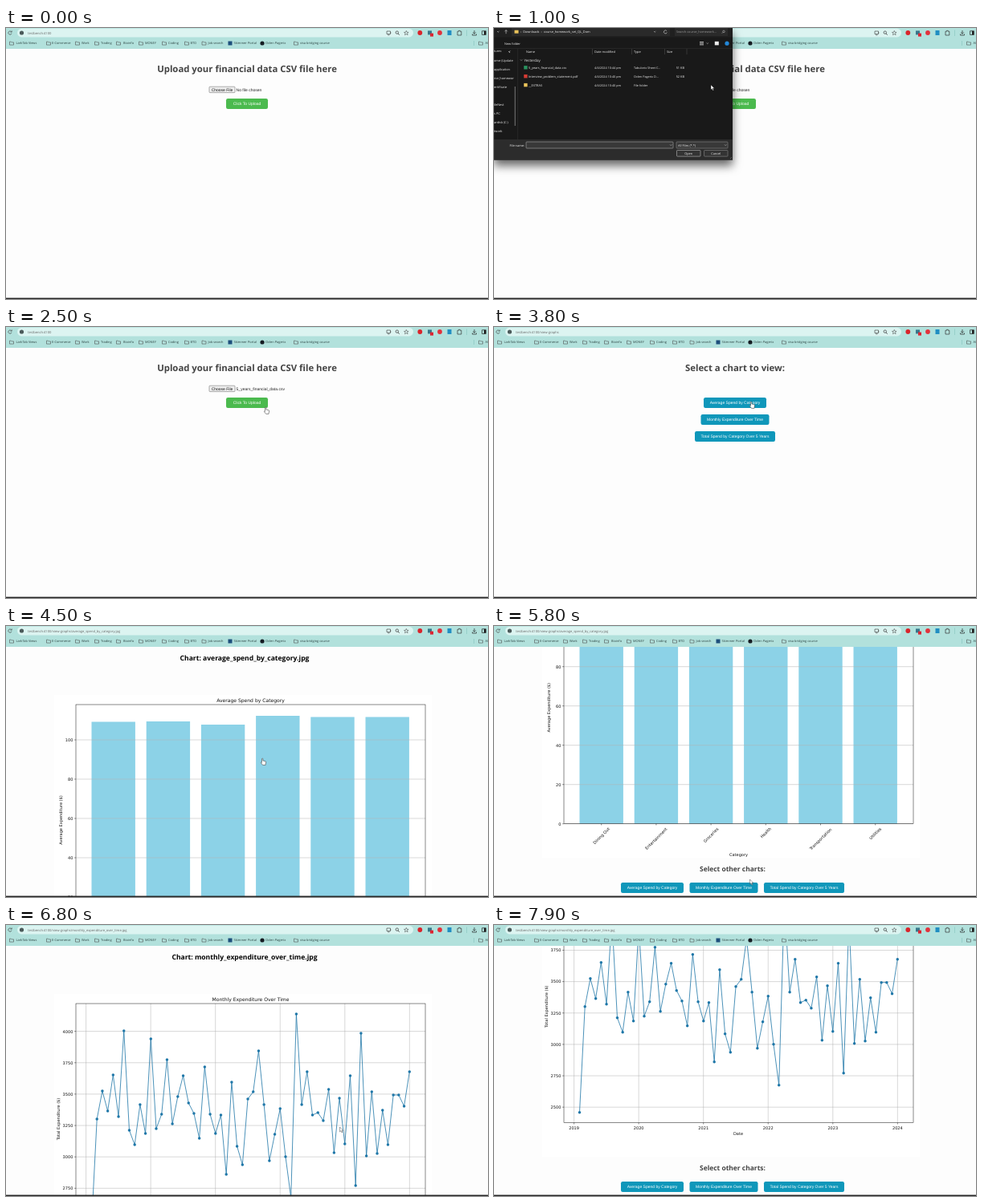
An HTML page for the animation above (8 s loop, 600 px wide and 338 px high).

```html
<!DOCTYPE html>
<html lang="en">
<head>
<meta charset="utf-8">
<title>Financial data upload</title>
<style>
  html, body { margin: 0; width: 100%; height: 100%; overflow: hidden; background: #fdfdfd; }
  svg { display: block; }
  text { font-family: "Open Sans", "Noto Sans", sans-serif; text-rendering: geometricPrecision; white-space: pre; }
  .arial { font-family: "Liberation Sans", Arial, sans-serif; }
  .plot { font-family: "DejaVu Sans", sans-serif; }
  .bold { font-weight: 700; }
  #dialog { filter: drop-shadow(0 7px 6px #0009); }
</style>
</head>
<body>
<svg id="stage" width="600" height="338" viewBox="0 0 600 338"></svg>
<script>
const LOOP = 8000, STEP = 100, SCROLL = 140.3;
const HOST = 'testbench:4100';

// Markup helpers
const text = (s, x, y, size, fill = '#222', cls = '', anchor = 'start', more = '') =>
  `<text x="${x}" y="${y}" font-size="${size}" fill="${fill}" class="${cls}" text-anchor="${anchor}" ${more}>${s}</text>`;
const rect = (x, y, w, h, fill, more = '') =>
  `<rect x="${x}" y="${y}" width="${w}" height="${h}" fill="${fill}" ${more}/>`;
const dot = (x, y, r, fill, more = '') => `<circle cx="${x}" cy="${y}" r="${r}" fill="${fill}" ${more}/>`;
const path = (d, stroke = '#333', width = .6, fill = 'none', more = '') =>
  `<path d="${d}" stroke="${stroke}" stroke-width="${width}" fill="${fill}" ${more}/>`;
const group = (id, body, more = '') => `<g id="${id}" ${more}>${body}</g>`;
const heading = (s, y, size, fill, x = 300) => text(s, x, y, size, fill, 'bold', 'middle');
const button = (s, x, y, w, fill) =>
  rect(x, y, w, 13, fill, 'rx="2.2"') + text(s, x + w / 2, y + 8.3, 5, '#fff', 'arial', 'middle');
const label = (s, x, y, anchor = 'middle', size = 5.04, more = '') =>
  text(s, x, y, size, '#111', 'plot', anchor, more);

const BLUE = '#0f97ba';
const CHARTS = [
  ['Average Spend by Category', 158, 78],
  ['Monthly Expenditure Over Time', 243.5, 85],
  ['Total Spend by Category Over 5 Years', 336, 100]
];

function uploadPage() {
  return heading('Upload your financial data CSV file here', 54.5, 11.35, '#444') +
    rect(253, 73.2, 32, 7.4, '#efefef', 'stroke="#777" stroke-width=".6" rx=".8"') +
    text('Choose File', 269, 78.6, 5, '#111', 'arial', 'middle') +
    text('No file chosen', 286.6, 78.6, 5, '#222', 'arial', 'start', 'id="chosen"') +
    button('Click To Upload', 274, 88, 52, '#4bba4e');
}

function menuPage() {
  return heading('Select a chart to view:', 54.5, 11.35, '#444') +
    CHARTS.map(([name, , w], i) => button(name, 300 - w / 2, 88 + i * 21, w, BLUE)).join('');
}

// Parts shared by both charts; they live in unscrolled page coordinates
function chartFrame(file, title, yTitle, yTitleX, body) {
  return heading('Chart: ' + file, 43.2, 8.55, '#000', 297) +
    rect(60, 86, 470, 344, '#fff') + body +
    rect(87, 98, 435, 289, 'none', 'stroke="#111" stroke-width=".5"') +
    label(title, 304.5, 95, 'middle', 6.05) +
    label(yTitle, 0, 0, 'middle', 5.04, `transform="translate(${yTitleX} 242) rotate(-90)"`) +
    heading('Select other charts:', 446.8, 8.45, '#444', 297) +
    CHARTS.map(([name, x, w]) => button(name, x, 460.3, w, BLUE)).join('');
}

const yTick = (value, y) =>
  path(`M87 ${y}H522`, '#b0b0b0', .5) + path(`M85.2 ${y}H87`, '#111', .5) + label(value, 83.4, y + 1.9, 'end');
const xTick = x => path(`M${x} 387v1.8`, '#111', .5);

function spendPage() {
  const bars = [
    ['Dining Out', 119.5, 12], ['Entertainment', 119, 15.5], ['Groceries', 123, 11],
    ['Health', 112, 8], ['Transportation', 113.5, 16], ['Utilities', 113.5, 9]
  ];
  let body = '', labels = '';
  bars.forEach(([name, top, drop], i) => {
    const x = 106.5 + i * 68.2, mid = x + 27.2;
    body += rect(x, top, 54.4, 387 - top, '#8cd2e7');
    labels += xTick(mid) +
      label(name, 0, 1.8, 'middle', 5.04, `transform="translate(${mid} ${390 + drop}) rotate(-45)"`);
  });
  for (let v = 0; v <= 100; v += 20) body += yTick(v, 387 - v * 2.45);
  return chartFrame('average_spend_by_category.jpg', 'Average Spend by Category',
    'Average Expenditure ($)', 69.6, body + labels + label('Category', 304.5, 427));
}

function monthlyPage() {
  const levels = [
    374, 242, 207, 232, 187, 239, 132, 256, 274, 224, 260, 142,
    254, 236, 168, 248, 214, 188, 222, 235, 266, 177, 236, 260,
    237, 311, 196, 276, 299, 217, 208, 157, 224, 294, 261, 229,
    289, 340, 111, 224, 183, 237, 234, 244, 205, 284, 216, 273,
    188, 325, 135, 288, 208, 285, 231, 274, 212, 212, 226, 183
  ];
  let body = '';
  for (let v = 2500; v <= 4000; v += 250) body += yTick(v, 367.5 - (v - 2500) * .1566);
  for (let i = 0; i < 6; i++) {
    const x = 99.6 + i * 80.55;
    body += path(`M${x} 98V387`, '#b0b0b0', .5) + xTick(x) + label(2019 + i, x, 395.3);
  }
  const points = levels.map((y, i) => [106.5 + i * 6.708, y]);
  body += path('M' + points.join('L'), '#1f77a8', .8) +
    points.map(([x, y]) => dot(x, y, 1.75, '#1f77a8')).join('') + label('Date', 304, 402.3);
  return chartFrame('monthly_expenditure_over_time.jpg', 'Monthly Expenditure Over Time',
    'Total Expenditure ($)', 66.6, body);
}

const folder = (x, y) => path(`M${x - 2.5} ${y - 1.9}h1.8l.8 .8h2.4v3.2h-5z`, '#444', .55);

function browser() {
  const marks = [
    ['LarkTab Views', 7, 12.5], ['E-Commerce', 53, 57], ['Work', 89, 94], ['Trading', 113, 118],
    ['Bioinfo', 140, 146], ['MONEY', 168, 173], ['Coding', 197, 202], ['BTO', 225, 229.5],
    ['Job search', 246.5, 251.5], ['Skimmer Portal', 279, 283.5], ['Ovlen Pagerix', 319, 323],
    ['visa bridging course', 361, 366], ['All', 591, 596.5]
  ];
  const icon = (x, i) => i === 9 ? rect(276.5, 16.5, 5, 5, '#1d4f7c')
    : i === 10 ? dot(319, 19, 2.6, '#151c22') : folder(x, 19);
  return rect(0, 0, 600, 26, '#b2e1dc') + rect(14, .8, 493, 10.6, '#dcf4f1', 'rx="5.3"') +
    path('M6.6 4.7a2.1 2.1 0 1 0 .4 2M7.2 3.4v1.7h-1.7') + dot(19.5, 6, 2.6, '#4b5a5a') +
    text('', 27, 7.8, 4.1, '#666', '', 'start', 'id="url"') +
    path('M474 4h4.5v3.5h-4.5zM475 8.8h2.6M478 6h1.5') +
    dot(486.8, 5.6, 1.7, 'none', 'stroke="#333" stroke-width=".7"') + path('M488 6.9l1.7 1.8', '#333', .8) +
    path('M498.3 3.4l.8 1.9 2 .1-1.6 1.3.6 2-1.8-1.1-1.8 1.1.6-2-1.6-1.3 2-.1z', '#333', .5) +
    dot(515.3, 6, 2.9, '#d9242b') + rect(525, 3.4, 5, 5, '#38788c') + rect(528, 6.6, 4, 4, '#dc2432') +
    dot(540, 6, 2.9, '#e2323c') + rect(549.5, 3, 5, 6, '#218ec2') +
    path('M562 4.2h1.6v-.9h1.6v.9h1.6v4.8h-4.8z', '#333', .7) + path('M573.5 2.5v7.5', '#7dbdb6', .5) +
    path('M583 3v4.2M581.2 5.5l1.8 1.8 1.8-1.8M580.5 7.5v1.5h5v-1.5', '#222', .7) +
    rect(592.7, 3.8, 4.6, 4.6, 'none', 'stroke="#222" stroke-width=".7"') + rect(595, 3.8, 2.3, 4.6, '#222') +
    path('M582.5 16v6', '#7dbdb6', .5) +
    marks.map(([name, x, tx], i) => icon(x, i) + text(name, tx, 20.4, 3.95, '#29403f')).join('') +
    rect(0, 336.6, 600, 1.4, '#242424');
}

function fileDialog() {
  const white = (s, x, y, anchor = 'start', size = 3.9, fill = '#eee') => text(s, x, y, size, fill, '', anchor);
  const box = (x, y, w, h, fill, stroke = '#8a8a8a') =>
    rect(x, y, w, h, fill, `stroke="${stroke}" stroke-width=".6" rx=".8"`);
  const side = [['tures', 30], ['ome (Update', 42], ['application', 53], ['rse_homewor', 64], ['ertificate', 75],
    ['ileNest', 97], ['s PC', 108], ['ardisk (C:)', 119], ['twork', 130]];
  const files = [
    ['5_years_financial_data.csv', '10:44 pm', 'Tabulorix Sheet C...', '51 KB', '#2a9460'],
    ['Interview_problem_statement.pdf', '10:40 pm', 'Ovlen Pagerix D...', '52 KB', '#d43b34'],
    ['__EXTRAS', '10:40 pm', 'File folder', '', '#e9c25a']
  ];
  const rows = files.map(([name, time, type, size, color], i) => {
    const y = 49.3 + i * 10.9, b = y + 1.4;
    return rect(37.2, y - 2.2, 4.4, 4.4, color) + white(name, 43, b) + white('4/4/2024 ' + time, 125, b, 'start', 3.75) +
      white(type, 174, b, 'start', 3.75) + white(size, 237, b, 'end');
  }).join('');
  return rect(0, 0, 297, 164.5, '#191919') + rect(0, 0, 297, 11.5, '#202020') +
    rect(22, -2, 197, 12, '#2a2a2a') + rect(225, -2, 66, 12, '#2a2a2a') +
    path('M15 7.2V2.6M13.3 4.3L15 2.6l1.7 1.7M4 4l1.2 1.2L6.4 4', '#ddd') +
    rect(25.5, 2.7, 5, 4, '#e9c25a') + white('›  Downloads  ›  course_homework_set_QL_Dom', 33, 6.3) +
    path('M199 4l1.2 1.2 1.2-1.2', '#ccc') + path('M215 3.7a2 2 0 1 0 .3 1.8', '#ddd') +
    white('Search course_homework...', 227, 6.3, 'start', 3.9, '#999') +
    dot(286, 4.4, 1.3, 'none', 'stroke="#ccc" stroke-width=".5"') + path('M285 5.4l-1.2 1.2', '#ccc') +
    white('New folder', 13, 20.6) +
    path('M256 17.5h5M256 19.2h5M256 20.9h5', '#ddd', .8) + path('M264.5 18.5l1.2 1.2 1.2-1.2', '#ccc') +
    rect(274.8, 16.8, 5, 4.6, '#eee') + dot(290, 19.2, 2.6, '#2387d8') +
    path('M0 25.5H297M29.5 25.5V139', '#333', .5) +
    side.map(([s, y]) => white(s, 0, y)).join('') + path('M26.2 73V122', '#aaa', .7) +
    path('M18 29l2 2M20.2 28.4l-1.7 1.7', '#bbb', .8) +
    white('Name', 40, 30.6) + white('Date modified', 125, 30.6) + white('Type', 174, 30.6) + white('Size', 215, 30.6) +
    path('M122.5 26v7M171.5 26v7M212.5 26v7M240 26v7', '#555', .5) +
    path('M32.8 39.4l1.2 1.2 1.2-1.2', '#ccc', .5) + white('Yesterday', 37.5, 41.6, 'start', 4.5) +
    group('picked', rect(31, 44, 210, 10.6, '#4a4a4a')) + rows +
    rect(0, 139, 297, 25.5, '#2c2c2c') + white('File name:', 38, 147.5, 'end') +
    box(40, 142, 183, 8, '#383838', '#aaa') + box(227, 142, 64, 8, '#383838') +
    group('fileName', white('5_years_financial_data.csv', 42, 147.5)) +
    white('All Files (*.*)', 229, 147.5) + path('M219 145.4l1.2 1.2 1.2-1.2M287 145.4l1.2 1.2 1.2-1.2', '#ddd', .5) +
    box(227.5, 152.5, 29.5, 7.6, '#333', '#bbb') + white('Open', 242.2, 157.7, 'middle') +
    box(261.5, 152.5, 29.5, 7.6, '#333') + white('Cancel', 276.2, 157.7, 'middle') +
    path('M294 163l2-2', '#888', .5);
}

const stage = document.getElementById('stage');
stage.innerHTML = rect(0, 0, 600, 338, '#fdfdfd') +
  [uploadPage, menuPage, spendPage, monthlyPage].map((make, i) => group('page' + i, make())).join('') +
  group('browser', browser()) + group('dialog', fileDialog()) +
  group('cursor',
    group('arrow', path('M0 0V6l1.4-1.3 1 2.2 1-.5-1-2.1h1.9z', '#222', .4, '#fff')) +
    group('hand', path('M1.5 4.4V.8a.7.7 0 0 1 1.4 0V3l3 .7q.8.2.7 1L6 8.4H2.6L.2 5.4q.5-1 1.3-.1z', '#222', .5, '#fff')));
const $ = id => document.getElementById(id);
const show = (id, on) => $(id).setAttribute('display', on ? 'inline' : 'none');
const move = (id, x, y) => $(id).setAttribute('transform', `translate(${x} ${y})`);

// Rows are [time, ...values]; values ease from row to row
function at(rows, t) {
  const i = rows.findIndex(r => r[0] > t);
  if (i < 1) return (i ? rows[rows.length - 1] : rows[0]).slice(1);
  const a = rows[i - 1], b = rows[i], p = (t - a[0]) / (b[0] - a[0]), e = p * p * (3 - 2 * p);
  return a.slice(1).map((v, k) => v + (b[k + 1] - v) * e);
}

const POINTER = [
  [100, 330, 192], [500, 270, 76], [1000, 270, 71], [1500, 90, 48], [1650, 90, 48], [1900, 242, 154],
  [2050, 242, 154], [2400, 321, 100], [3000, 321, 100], [3500, 318, 93], [3900, 318, 93], [4400, 317, 165],
  [5000, 317, 165], [5600, 318.5, 316], [5800, 318.5, 316], [6000, 300, 324], [6200, 300, 324], [6700, 415.5, 252]
];
const SCROLLS = [
  [[4700, 0], [5400, SCROLL]],
  [[7200, 0], [7800, SCROLL]]
];
const PATHS = ['', '/view-graphs', '/view-graphs/average_spend_by_category.jpg', '/view-graphs/monthly_expenditure_over_time.jpg'];
const between = (t, a, b) => t >= a && t < b;

function draw(now) {
  const t = Math.floor(now % LOOP / STEP) * STEP;
  const page = [2900, 3900, 6200].filter(start => t >= start).length;
  PATHS.forEach((_, i) => show('page' + i, i === page));
  if (page > 1) move('page' + page, 0, -at(SCROLLS[page - 2], t)[0]);
  $('url').textContent = HOST + PATHS[page];
  $('chosen').textContent = t < 2000 ? 'No file chosen' : '5_years_financial_data.csv';
  show('dialog', between(t, 700, 2000));
  show('picked', t >= 1600);
  show('fileName', t >= 1600);
  const hand = between(t, 2300, 2900) || between(t, 3400, 4600) || between(t, 5900, 6200);
  show('cursor', between(t, 100, 7400));
  show('hand', hand);
  show('arrow', !hand);
  move('cursor', ...at(POINTER, t));
}

const start = performance.now();
(function tick() {
  draw(performance.now() - start);
  requestAnimationFrame(tick);
})();
</script>
</body>
</html>
```
